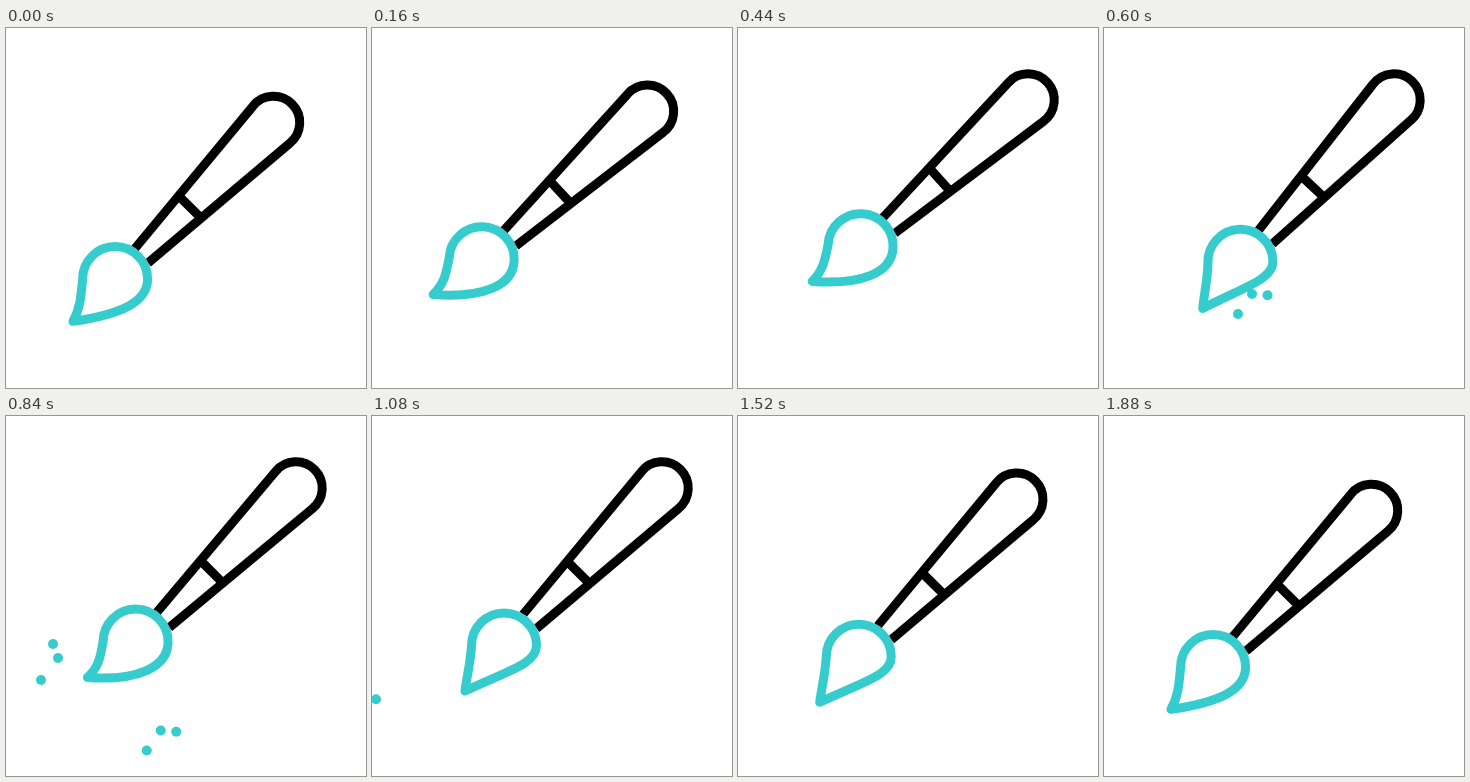
These frames come from a looping animation (360 by 360 pixels, 2120 ms). An HTML page:

```html
<!DOCTYPE html>
<html lang="en">
<head>
<meta charset="utf-8">
<title>Paint brush</title>
<style>
  html, body { margin: 0; width: 100%; height: 100%; overflow: hidden; background: #fff; }
  svg { display: block; width: 100vw; height: 100vh; }
  path { fill: none; stroke-width: 9; stroke-linejoin: round; }
  #handle { stroke: #000; }
  #bristle { stroke: #36cbcc; }
  circle { fill: #36cbcc; }
</style>
</head>
<body>
<svg viewBox="0 0 360 360">
  <g id="drops"></g>
  <g id="brush">
    <path id="handle" d="M128.500 221L246.800 78.300A26.300 26.300 0 1 1 283.800 115.200L142 235M172.300 167.500L194.500 189.500"/>
    <path id="bristle"/>
  </g>
</svg>
<script>
const LOOP = 2120, STEP = 40;
const $ = id => document.getElementById(id);

// Smooth 0 to 1 between two times, and a bump that rises and falls.
function ease(from, to, t) {
  const p = Math.min(1, Math.max(0, (t - from) / (to - from)));
  return p * p * (3 - 2 * p);
}
const bump = (from, peak, to, t) => ease(from, peak, t) * (1 - ease(peak, to, t));

// Two splashes: position at time `at`, speed and fall per ms, growing spread.
const splashes = [
  { from: 560, at: 600, x: 148, y: 266, vx: 0.028, vy: 0.13, fall: 0.0003, spread: 0,
    offsets: [[0, 0], [15.5, 1.3], [-14, 20]] },
  { from: 720, at: 840, x: 52, y: 242, vx: -0.2, vy: 0.09, fall: 0.00034, spread: 0.004,
    offsets: [[0, 0], [-5, -14], [-17, 22]] }
];
for (const s of splashes) {
  s.dots = s.offsets.map(() => {
    const dot = document.createElementNS("http://www.w3.org/2000/svg", "circle");
    dot.setAttribute("r", 5);
    return $("drops").appendChild(dot);
  });
}

// A half-circle head whose point bends to the left as curl goes from 0 to 1.
function bristle(curl) {
  const bend = curl * curl, r = 32.5;
  const cx = 109.5 - 2 * bend, cy = 252 - 4.5 * bend;
  const tip = [70.5 - 17.5 * bend, 297.5 - 20.5 * bend];
  const from = (length, angle) =>
    [tip[0] + length * Math.cos(angle), tip[1] + length * Math.sin(angle)];
  const inner = from(14, -1.45 + 0.9 * curl);
  const outer = from(50, -0.44 + 0.66 * curl);
  return `M${tip}C${inner} ${cx - r - 1 - 3 * bend} ${cy + 18} ${cx - r} ${cy}` +
    `A${r} ${r} 0 0 1 ${cx + r} ${cy}` +
    `C${cx + r} ${cy + 18 + 10 * curl} ${outer} ${tip}Z`;
}

function draw(t) {
  const back = 1 - ease(1300, 1740, t);
  const x = 22.5 * ease(0, 400, t) * back;
  const y = -22.5 * ease(0, 320, t) * back;
  const swing = bump(0, 340, 600, t), echo = bump(600, 800, 1080, t);
  const angle = 5.6 * swing - 1.6 * bump(340, 600, 800, t) + 0.5 * echo;
  const rest = 1 - ease(0, 340, t) + ease(1520, 1880, t);

  $("brush").setAttribute("transform", `translate(${x} ${y}) rotate(${angle} 267 95)`);
  $("bristle").setAttribute("d", bristle(0.45 * rest + 1.03 * swing + 0.8 * echo));

  for (const s of splashes) {
    const dt = t - s.at, scale = 1 + s.spread * dt;
    s.dots.forEach((dot, i) => {
      const [dx, dy] = s.offsets[i];
      dot.setAttribute("cx", s.x + s.vx * dt + dx * scale);
      dot.setAttribute("cy", s.y + s.vy * dt + s.fall * dt * dt + dy * scale);
      dot.setAttribute("visibility", t >= s.from && t < 1160 ? "visible" : "hidden");
    });
  }
}

function tick() {
  const t = performance.now() % LOOP;
  draw(Math.floor(t / STEP) * STEP);
  requestAnimationFrame(tick);
}
tick();
</script>
</body>
</html>
```
